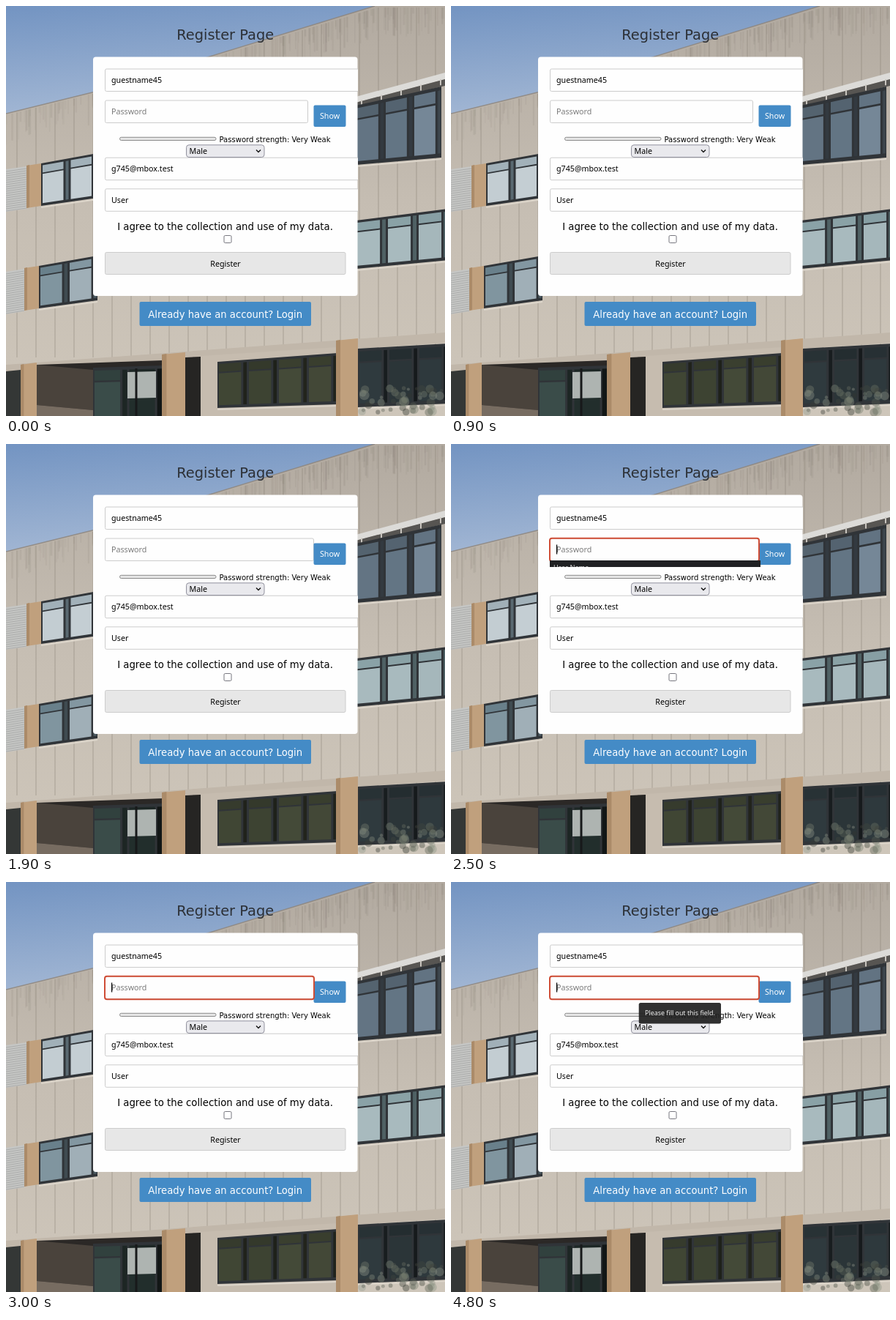
Write an HTML page that moves like this. It is 600 px wide and 560 px high and loops after 5100 ms.

```html
<!DOCTYPE html>
<html lang="en">
<head>
<meta charset="utf-8">
<title>Register Page</title>
<style>
html, body { margin: 0; width: 100%; height: 100%; overflow: hidden; background: #c9c1b5; }
svg { display: block; width: 600px; height: 560px; }
.ui { font-family: "Noto Sans", "Open Sans", sans-serif; font-size: 10.7px; }
.page { font-family: "DejaVu Sans", sans-serif; }
.small { font-size: 9.2px; }
.sub { font-size: 8.8px; fill: #a5a5a5; }
.mid { text-anchor: middle; }
.field { fill: #fefefe; stroke: #ccc; }
.blue { fill: #448bc6; }
</style>
</head>
<body>
<svg viewBox="0 0 600 560">
  <defs>
    <linearGradient id="sky" x2=".2" y2="1">
      <stop offset="0" stop-color="#7394c2"/>
      <stop offset="1" stop-color="#b3c3da"/>
    </linearGradient>
    <linearGradient id="wall" x2="0" y2="1">
      <stop offset="0" stop-color="#b2aaa0"/>
      <stop offset=".5" stop-color="#c6beb3"/>
      <stop offset="1" stop-color="#cec6ba"/>
    </linearGradient>
    <clipPath id="cardClip"><rect x="119" y="70" width="362" height="326"/></clipPath>
    <clipPath id="openClip"><rect x="135" y="159" width="288" height="9"/></clipPath>
  </defs>

  <rect width="600" height="200" fill="url(#sky)"/>
  <g id="building"></g>

  <text class="page mid" x="299.7" y="45.5" font-size="19.4" fill="#2c3036">Register Page</text>
  <rect x="119" y="69.5" width="361.5" height="326.5" rx="4" fill="#fefefe"/>
  <g id="fields" clip-path="url(#cardClip)"></g>
  <rect id="pass" class="field" x="135.5" y="129" height="30.5" rx="2"/>
  <rect class="blue" x="420.5" y="135.5" width="44" height="29.5" rx="2"/>
  <rect id="focus" x="135" y="128.8" width="286" height="31.4" rx="3" fill="none" stroke="#cf4d36" stroke-width="2"/>
  <g class="ui">
    <text x="144" y="105">guestname45</text>
    <text x="144" y="148" fill="#7b7b7b">Password</text>
    <text class="mid" x="442.5" y="154" fill="#fff">Show</text>
    <text x="144" y="226">g745@mbox.test</text>
    <text x="144" y="268.7">User</text>
  </g>
  <rect id="caret" x="144" y="137.5" width="1.2" height="13"/>

  <rect x="155.5" y="179.3" width="131.5" height="4.2" rx="2" fill="#e6e6e6" stroke="#8a8a8a"/>
  <text class="page" x="291.5" y="185.5" font-size="10.05">Password strength: Very Weak</text>
  <rect x="246.5" y="189.8" width="106.5" height="16.7" rx="3.5" fill="#e9e9ed" stroke="#92929e"/>
  <text class="ui" x="250.5" y="202">Male</text>
  <path d="M342 196.5l3 3 3-3" fill="none" stroke="#111" stroke-width="1.4"/>

  <text class="page mid" x="299.5" y="305.5" font-size="13.27">I agree to the collection and use of my data.</text>
  <rect x="298" y="313.5" width="10" height="10" rx="1.5" fill="#fff" stroke="#77777f"/>
  <rect x="135.5" y="336.5" width="328.5" height="30" rx="2" fill="#e7e7e7" stroke="#ccc"/>
  <text class="ui mid" x="300" y="356">Register</text>
  <rect class="blue" x="182.5" y="404" width="234.5" height="33" rx="2"/>
  <text class="page mid" x="299.7" y="426" font-size="13.2" fill="#fff">Already have an account? Login</text>

  <g id="opening" clip-path="url(#openClip)">
    <rect x="135" y="159" width="288" height="9" fill="#202123"/>
    <text class="ui small" x="140" y="172" fill="#ddd">User Name</text>
  </g>
  <g id="menu" fill="#f5f5f5">
    <rect x="135.3" y="159" width="285.4" height="167.5" rx="3" fill="#242323" stroke="#4b4b4d" stroke-width=".8"/>
    <rect x="136" y="299.5" width="284" height="23.5" fill="#565656"/>
    <g id="logins" class="ui small"></g>
    <g fill="none" stroke="#a9a9ac" stroke-width=".9">
      <circle cx="144.5" cy="279" r="4.2"/>
      <ellipse cx="144.5" cy="279" rx="1.9" ry="4.2"/>
      <path d="M140.3 279h8.4"/>
    </g>
    <text class="ui small" x="156.5" y="282">Use a Securely Generated Password</text>
    <text x="156.5" y="294" font-size="9.1" fill="#a5a5a5" font-family="DejaVu Sans Mono, monospace">t2),iJt*z;2#xpW</text>
    <text class="ui small mid" x="277" y="314.7">View Saved Logins</text>
  </g>
  <g id="tip">
    <rect x="256.7" y="165" width="112.3" height="28.5" rx="2.5" fill="#222" opacity=".93"/>
    <text class="ui mid" x="313" y="182.3" style="font-size:8.9px" fill="#f2f2f2">Please fill out this field.</text>
  </g>
</svg>
<script>
const $ = id => document.getElementById(id);
const building = $("building");

function add(tag, attrs, parent = building) {
  const el = document.createElementNS("http://www.w3.org/2000/svg", tag);
  for (const k in attrs) el.setAttribute(k, attrs[k]);
  return parent.appendChild(el);
}
const line = (d, stroke, width = 1, opacity = 1) =>
  add("path", { d, stroke, "stroke-width": width, opacity, fill: "none" });

// Upright quad: left edge y0..b0, right edge y1..b1.
const slab = (x0, x1, y0, y1, b0, b1, fill) =>
  add("polygon", { points: `${x0},${y0} ${x1},${y1} ${x1},${b1} ${x0},${b0}`, fill });

let seed = 7;
const rnd = () => (seed = (seed * 16807) % 2147483647) / 2147483647;
const roof = x => Math.max(0, 147 - x * .245 - Math.max(0, x - 119) * .058);

// Wide panes parted by narrow dark ones, under a transom.
function windows(x0, x1, y0, y1, b0, b1, count, hue, light) {
  const top = x => y0 + (y1 - y0) * (x - x0) / (x1 - x0);
  const low = x => b0 + (b1 - b0) * (x - x0) / (x1 - x0);
  const pane = (a, b, from, to, fill) => {
    const y = (x, v) => top(x) + (low(x) - top(x)) * v;
    slab(a, b, y(a, from), y(b, from), y(a, to), y(b, to), fill);
  };
  pane(x0, x1, 0, 1, "#303438");
  const step = (x1 - x0) / count;
  for (let i = 0; i < count; i++) {
    const a = x0 + i * step + 2, b = a + step * .74;
    const l = light + (rnd() - .5) * 12;
    pane(a, b, .05, .22, `hsl(${hue} 14% ${l * .85}%)`);
    pane(a, b, .25, .94, `hsl(${hue} 14% ${l}%)`);
    pane(b + 3, x0 + (i + 1) * step - 1, .05, .94, `hsl(${hue} 12% ${l * .5}%)`);
  }
  line(`M${x0} ${b0 + 2}L${x1} ${b1 + 2}`, "#dcd5ca", 2);
}

function blinds(width, y, height) {
  slab(0, width, y, y - 4, y + height, y + height - 4, "#c5c6c4");
  for (let k = 3; k < height; k += 3) line(`M0 ${y + k}L${width} ${y + k - 4}`, "#8f9292", .7, .7);
}

const pillar = (x, width, y, bottom) => {
  slab(x, x + width, y, y - 3, bottom, bottom - 3, "#c0a07d");
  slab(x, x + width * .2, y, y - 1, bottom, bottom - 1, "#ab8b69");
};

function wall() {
  add("polygon", { points: `0,${roof(0)} 119,${roof(119)} 504,0 600,0 600,560 0,560`, fill: "url(#wall)" });
  line(`M0 ${roof(0)}L119 ${roof(119)} 504 0`, "#8b847c", 1.6, .8);
  for (let i = 0; i < 200; i++) {
    const x = rnd() * 600;
    line(`M${x} ${roof(x) + 2}v${8 + rnd() * 35}`, "#776f66", 1 + rnd() * 2, .05 + rnd() * .09);
  }
  for (let x = 15; x < 600; x += 26) line(`M${x} ${roof(x) + 2}V480`, "#857d73", 1, .5);
}

function leftRows() {
  for (const [y, x] of [[215, 48], [355, 45]]) {
    blinds(x - 20, y + 8, 58);
    pillar(x - 20, 20, y + 3, y + 61);
    windows(x, 125, y, y - 14, y + 58, y + 47, 2, 200, y < 300 ? 78 : 62);
  }
}

function rightRows() {
  slab(478, 600, 124, 91, 132, 100, "#dcdbd8");
  slab(478, 600, 132, 100, 138, 109, "#575552");
  for (let x = 486; x < 600; x += 27) line(`M${x} ${130 - (x - 480) * .26}v8`, "#c9c5bf", 2);
  windows(478, 595, 136, 110, 217, 207, 3, 208, 50);
  windows(478, 604, 293, 277, 359, 347, 3, 190, 68);
}

function groundFloor() {
  slab(0, 600, 490, 446, 500, 460, "#c1b7aa");
  slab(42, 215, 490, 484, 560, 560, "#2b2826");
  slab(42, 119, 490, 497, 545, 552, "#4a433c");
  slab(42, 119, 545, 552, 560, 560, "#776c61");
  windows(119, 214, 494, 491, 575, 575, 2, 170, 21);
  slab(166, 205, 500, 499, 536, 535, "#aeb4b1");
  line("M178 495V560", "#17191a", 3);
  slab(0, 20, 499, 497, 560, 560, "#343736");
  pillar(20, 22, 490, 563);
  pillar(213, 32, 476, 563);
  slab(245, 266, 480, 479, 560, 560, "#262523");
  slab(266, 452, 478, 466, 560, 560, "#c6bcaf");
  windows(289, 453, 486, 474, 549, 544, 4, 80, 27);
  pillar(451, 30, 457, 563);
  windows(481, 604, 468, 461, 548, 543, 3, 195, 25);
  for (let i = 0; i < 50; i++) {
    const cx = 485 + rnd() * 115;
    add("circle", { cx, cy: 555 - rnd() * 34, r: 2 + rnd() * 5, fill: `hsl(90 6% ${20 + rnd() * 40}%)`, opacity: .4 });
  }
}

function form() {
  for (const y of [86, 207.2, 249.8])
    add("rect", { class: "field", x: 135.5, y, width: 360, height: 30.5, rx: 2 }, $("fields"));
  const box = $("logins");
  ["No username (Dec 23, 2023)", "' or '1'='1", "Clara", "zequinhas"].forEach((name, i) => {
    const y = 173 + i * 27.2;
    add("text", { x: 156.5, y }, box).textContent = name;
    add("text", { x: 156.5, y: y + 12, class: "sub" }, box).textContent = "From this website";
    add("rect", { x: 140, y: y - 2, width: 9, height: 8, rx: 1, fill: "#23384f", stroke: "#9aa8b5", "stroke-width": .8 }, box);
    add("rect", { x: 140, y: y - 2, width: 9, height: 2, fill: "#b7c5d2" }, box);
    add("path", { d: `M142 ${y + 1.5}l1.5 1-1.5 1M144.5 ${y + 3.8}h2`, stroke: "#75b5ea", "stroke-width": .8, fill: "none" }, box);
  });
}

const LOOP = 5100;
const show = (id, on) => $(id).setAttribute("visibility", on ? "visible" : "hidden");

function draw(t) {
  $("pass").setAttribute("width", t < 1700 ? 277 : t < 1900 ? 281 : 285);
  show("focus", t >= 2400);
  show("caret", t >= 2400 && t < 3600 || t >= 4800);
  show("opening", t >= 2500 && t < 2600);
  show("menu", t >= 2600 && t < 3000);
  show("tip", t >= 3900);
}

wall();
leftRows();
rightRows();
groundFloor();
form();
const start = performance.now();
function tick() {
  draw((performance.now() - start) % LOOP);
  requestAnimationFrame(tick);
}
draw(0);
requestAnimationFrame(tick);
</script>
</body>
</html>
```
